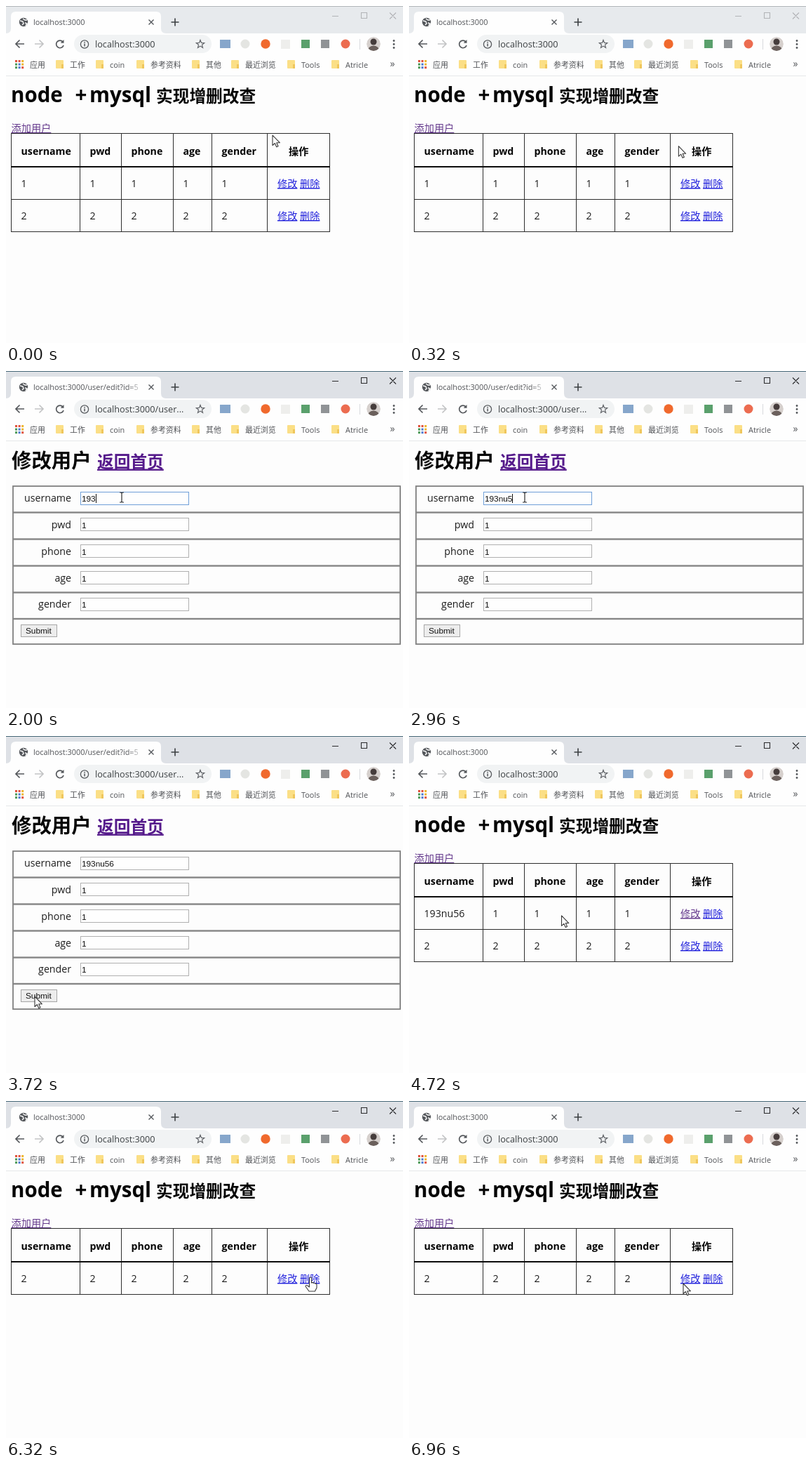
Recreate the animation shown at these times as an HTML page. Size 566 by 480 pixels, loop 7 s.

```html
<!DOCTYPE html>
<html lang="zh-CN">
<head>
<meta charset="utf-8">
<title>User admin</title>
<style>
  html, body { margin: 0; width: 100%; height: 100%; overflow: hidden; }
  svg { display: block; width: 566px; height: 480px; }
  text { font: 14.2px "Open Sans", "Noto Sans CJK SC", "Noto Sans CJK", sans-serif; fill: #1c1c1c; white-space: pre; }
  .bold { font-weight: 700; fill: #050505; }
  .small { font-size: 10.9px; fill: #505256; }
  .url { font-size: 12.7px; fill: #3c4043; }
  .field { font: 11.8px "Liberation Sans", sans-serif; fill: #111; }
  .link { fill: #2121dc; text-decoration: underline; }
  .visited { fill: #653a8d; }
  .pressed { fill: #f4301c; }
  .icon { fill: none; stroke: #55585c; stroke-width: 1.7; }
</style>
</head>
<body>
<svg id="stage" viewBox="0 0 566 480"></svg>
<script>
const LOOP = 7000;
const ACTIVATE = 360, PRESS = 880, EDIT = 1040, FOCUS = 1640, BLUR = 3600, SAVE = 3920, REMOVE = 6120;
const NAME = "193nu56";
const KEYS = [1760, 1920, 2360, 2560, 2800, 3000];
const PATH = [
  [0, 380, 184], [240, 382, 190], [720, 396, 247], [1120, 396, 247], [1440, 340, 232],
  [1760, 165, 180], [3000, 165, 180], [3200, 135, 270], [3400, 80, 405], [3640, 41, 371],
  [4000, 41, 371], [4400, 68, 347], [4720, 217, 256], [5080, 402, 204], [5520, 455, 261],
  [5760, 434, 252], [6560, 434, 252], [6880, 391, 260], [7000, 391, 260]
];

const rect = (x, y, w, h, fill, extra = "") =>
  `<rect x="${x}" y="${y}" width="${w}" height="${h}" fill="${fill}" ${extra}/>`;
const circle = (x, y, r, fill, extra = "") =>
  `<circle cx="${x}" cy="${y}" r="${r}" fill="${fill}" ${extra}/>`;
const text = (x, y, value, cls = "", extra = "") =>
  `<text x="${x}" y="${y}" class="${cls}" ${extra}>${value}</text>`;
const path = (d, extra = 'class="icon"') => `<path d="${d}" ${extra}/>`;
const size = px => `style="font-size:${px}px"`;

function toolbar() {
  const folders = [[71, "工作"], [128, "coin"], [186, "参考资料"], [265, "其他"],
    [321, "最近浏览"], [401, "Tools"], [464, "Atricle"]];
  const dots = ["#e0523d", "#e0523d", "#edb52e", "#4c9a57", "#4b78d0", "#edb52e", "#4c9a57", "#4b78d0", "#e0523d"];
  const star = Array.from({ length: 10 }, (_, i) => {
    const r = i % 2 ? 2.6 : 6, a = i * Math.PI / 5;
    return `${277 + r * Math.sin(a)},${54.5 - r * Math.cos(a)}`;
  }).join(" ");
  return rect(97, 41, 196, 26, "#f1f3f4", 'rx="13"')
    + path("M26 54H14M19.5 48.5L14 54L19.5 59.5")
    + path("M41 54H53M47.5 48.5L53 54L47.5 59.5", 'class="icon" opacity=".35"')
    + path("M81 51A5.3 5.3 0 1 0 82 56") + path("M82.5 48V52.8H77.7Z", 'fill="#55585c"')
    + circle(112, 54.5, 5.6, "none", 'stroke="#55585c" stroke-width="1.3"')
    + rect(111.3, 53.5, 1.5, 4, "#55585c") + rect(111.3, 51, 1.5, 1.5, "#55585c")
    + `<polygon points="${star}" fill="none" stroke="#606368" stroke-width="1.2"/>`
    + rect(305, 48, 15, 12, "#86a6cb")
    + circle(341, 54, 6.5, "#e4e5e2")
    + circle(370, 54, 6.7, "#f0692d")
    + rect(392, 48, 13, 13, "#eeeeec")
    + rect(421, 48, 12, 12, "#5aa06c")
    + rect(449, 48, 12, 12, "#909396")
    + circle(484, 54, 6.5, "#ec6c50")
    + rect(504, 47, 1, 15, "#d8dadd")
    + `<g clip-path="url(#avatar)">${circle(524, 54, 10, "#d6d0cd")}${circle(524, 51, 4.5, "#463d3c")}`
    + `<ellipse cx="524" cy="63" rx="8" ry="6.5" fill="#6b605c"/></g>`
    + [49.5, 54.5, 59.5].map(y => circle(553, y, 1.4, "#55585c")).join("")
    + dots.map((c, i) => rect(13 + i % 3 * 4.6, 77 + Math.floor(i / 3) * 4.6, 3, 3, c)).join("")
    + text(34, 87.5, "应用", "small")
    + folders.map(([x, label]) => rect(x, 77, 11, 12, "#fbdf86", 'rx="1"')
      + rect(x + 8, 83, 3, 6, "#efc65c") + text(x + 20, 87.5, label, "small")).join("")
    + text(547.5, 87, "»", "small", size(14))
    + rect(0, 99, 566, 1, "#e6e8ea");
}

function chrome(active, editing) {
  const strip = active ? "#dee1e6" : "#e7eaed";
  const control = `fill="none" stroke="${active ? "#2c2c2e" : "#b2b4b7"}" stroke-width="1.1"`;
  const tab = "#fefefe";
  return rect(0, 0, 566, 39, strip)
    + rect(0, 0, 566, 1, active ? "#4a6b7a" : "#b4b8bb")
    + path("M0 39Q7 39 7 32V15Q7 8 14 8H214Q221 8 221 15V32Q221 39 228 39Z", `fill="${tab}"`)
    + rect(0, 39, 566, 60, tab)
    + circle(25, 23, 6.2, "#55585c")
    + path("M20 21l4 1 1 3-2 2M24 18l3 2 3 0M27 24l3 1-2 3", `fill="none" stroke="${tab}" stroke-width="1.4"`)
    + text(39, 27, editing ? "localhost:3000/user/edit?id=5" : "localhost:3000", "small", 'clip-path="url(#tab)"')
    + (editing ? rect(172, 12, 26, 22, "url(#fade)") : "")
    + path("M203.5 19.5l7 7m0-7l-7 7", 'fill="none" stroke="#55585c" stroke-width="1.4"')
    + path("M235.5 23h11M241 17.5v11", 'fill="none" stroke="#3c4043" stroke-width="1.6"')
    + path("M465 14.5h9M506.5 9.5h8v8h-8ZM547 9.5l9 9m0-9l-9 9", control)
    + toolbar()
    + text(127, 59, editing ? "localhost:3000/user..." : "localhost:3000", "url");
}

function listPage(t) {
  const edges = [7.5, 105.5, 164.5, 238.5, 293.5, 372.5, 461.5];
  const heads = ["username", "pwd", "phone", "age", "gender"];
  const rows = ["2"];
  if (t < REMOVE) rows.unshift(t < SAVE ? "1" : NAME);
  const rowLine = i => 275.5 + i * 46;
  const bottom = rowLine(rows.length - 1);
  const grid = edges.map(x => `M${x} 181.5V${bottom}`).join("")
    + "M7 181.5H462" + rows.map((_, i) => `M7 ${rowLine(i)}H462`).join("");
  const cells = rows.map((name, i) => {
    const y = 258 + i * 46;
    const first = rows.length === 2 && i === 0;
    const state = first && t >= SAVE ? "visited" : first && t >= PRESS && t < EDIT ? "pressed" : "";
    return heads.map((_, c) => text(edges[c] + 14, y, c ? name === "2" ? "2" : "1" : name)).join("")
      + text(387, y, "修改", `link ${state}`) + text(419, y, "删除", "link");
  }).join("");
  return [[7, "node"], [107, "+"], [119, "mysql"]].map(([x, word]) =>
      text(x, 137, word, "bold", size(29.5) + (word === "+" ? ' text-anchor="middle"' : ""))).join("")
    + text(214, 137, "实现增删改查", "bold", size(23.7))
    + text(7.5, 179, "添加用户", "link visited")
    + path(grid, 'fill="none" stroke="#2e2e2e"') + rect(7, 228, 455, 2, "#0c0c0c")
    + heads.map((h, i) => text(edges[i] + 14, 211.5, h, "bold")).join("")
    + text(403, 211.5, "操作", "bold") + cells;
}

function editPage(t) {
  const typed = NAME.slice(0, 1 + KEYS.filter(k => t >= k).length);
  const focused = t >= FOCUS && t < BLUR;
  const lastKey = KEYS.filter(k => t >= k).pop() || FOCUS;
  const fields = ["username", "pwd", "phone", "age", "gender"].map((label, i) => {
    const y = 172.5 + i * 37.9;
    const border = focused && !i ? "#6f9fd8" : "#b0b0b0";
    return text(93, y + 13.3, label, "", 'text-anchor="end"')
      + rect(106.5, Math.round(y) - .5, 154, 18, "#fefefe", `stroke="${border}"`)
      + text(108, y + 13.3, i ? "1" : typed, "field", i ? "" : 'id="name"');
  }).join("");
  return text(8, 138, "修改用户", "bold", size(28.4))
    + text(130, 137.5, "返回首页", "bold link", 'style="font-size:23.7px;fill:#551a8b"')
    + rect(10, 164, 552, 225, "none", 'stroke="#808080" stroke-width="1.8"')
    + [201.5, 239.5, 277.5, 315.5, 353].map(y => rect(9, y - 1.2, 554, 2.4, "#868686")).join("")
    + fields
    + rect(21.5, 361.5, 51, 17, "#ededed", 'stroke="#a6a6a6"')
    + text(28, 374, "Submit", "field")
    + (focused && (t - lastKey) % 1000 < 500 ? rect(0, 175, 1, 13, "#111", 'id="caret"') : "");
}

function pointer(t) {
  const i = PATH.findIndex(p => p[0] > t) - 1;
  const [t0, x0, y0] = PATH[i], [t1, x1, y1] = PATH[i + 1];
  const k = (t - t0) / (t1 - t0);
  return [x0 + (x1 - x0) * k, y0 + (y1 - y0) * k];
}

function cursor(t, editing) {
  const [x, y] = pointer(t);
  const overLink = !editing && y > 244 && y < 259 && ((x > 387 && x < 415) || (x > 419 && x < 448));
  const overField = editing && x > 106 && x < 261 && y > 172 && y < 343 && (y - 172) % 38 < 19;
  const outline = 'fill="#fefefe" stroke="#3a3a3a" stroke-width="1.1" stroke-linejoin="round"';
  const shape = overLink
    ? path("M-1.5 0Q0-2 1.5 0V7Q3 5.5 4.3 7.4Q6 6.3 6.8 8.2Q9 7.5 9 10V14L6.5 19H-2L-7 12Q-6.5 9.5-4 11L-1.5 13Z", outline)
    : overField
      ? path("M-3-7H-1L0-6L1-7H3M0-6V6M-3 7H-1L0 6L1 7H3", 'fill="none" stroke="#2c2c2c" stroke-width="1.2"')
      : path("M0 0V14.5L3.4 11.5L5.7 16.7L8 15.7L5.8 10.7H10.3Z", outline);
  return `<g transform="translate(${x} ${y})">${shape}</g>`;
}

const DEFS = `<defs>
  <clipPath id="tab"><rect x="39" y="10" width="157" height="26"/></clipPath>
  <clipPath id="avatar"><circle cx="524" cy="54" r="10"/></clipPath>
  <linearGradient id="fade"><stop offset="0" stop-color="#fefefe" stop-opacity="0"/><stop offset="1" stop-color="#fefefe"/></linearGradient>
</defs>`;
const stage = document.getElementById("stage");

function draw(t) {
  const active = t >= ACTIVATE;
  const editing = t >= EDIT && t < SAVE;
  stage.innerHTML = DEFS + rect(0, 0, 566, 480, "#fdfdfd")
    + chrome(active, editing) + (editing ? editPage(t) : listPage(t)) + cursor(t, editing);
  const caret = document.getElementById("caret");
  if (caret) caret.setAttribute("x", Math.round(108 + document.getElementById("name").getComputedTextLength()));
}

const start = performance.now();
function tick() {
  draw((performance.now() - start) % LOOP);
  requestAnimationFrame(tick);
}
tick();
</script>
</body>
</html>
```
